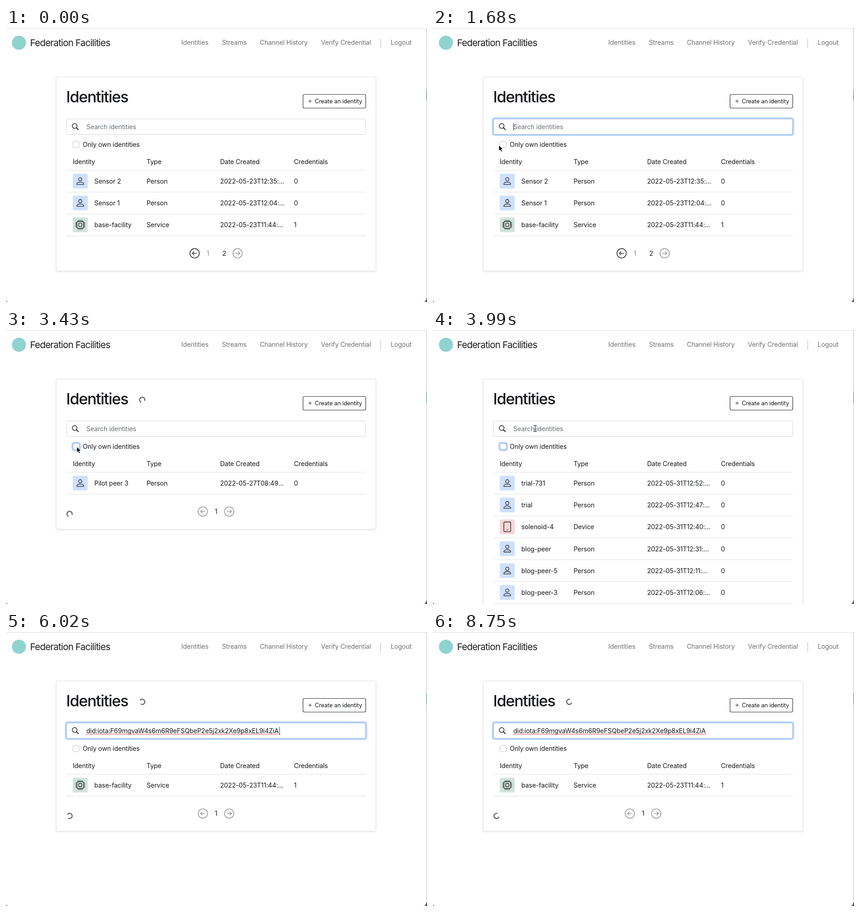
An HTML page for the animation above (8.82 s loop, 927 px wide and 604 px high).

```html
<!DOCTYPE html>
<html lang="en">
<head>
<meta charset="utf-8">
<title>Identities</title>
<style>
  html, body { margin: 0; width: 100%; height: 100%; overflow: hidden; background: #fff; }
  svg { display: block; width: 927px; height: 604px; }
  text { font: 430 14.2px Inter, "Noto Sans", sans-serif; letter-spacing: -.12px; fill: #16181b; white-space: pre; }
  .brand { font-size: 20.5px; letter-spacing: -.8px; fill: #1c1c1c; }
  .title { font-size: 34.2px; font-weight: 550; letter-spacing: -1.38px; }
  .nav { fill: #6f6f6f; }
  .hint { fill: #6a7076; }
  .small { font-size: 12.7px; }
  .mid { text-anchor: middle; }
  .off { fill: #8b8b8b; }
  .line { fill: none; stroke-linecap: round; stroke-linejoin: round; }
  .card { fill: #fff; stroke: #dfdfdf; filter: drop-shadow(0 2px 2px rgba(0,0,0,.08)); }
</style>
</head>
<body>
<svg viewBox="0 0 927 604" xmlns="http://www.w3.org/2000/svg">
  <rect width="927" height="604" fill="#b4b6b8"/>
  <path d="M926 136v24" stroke="#2f6b5c" stroke-width="2"/>
  <path d="M0 604v-6M927 604v-8" stroke="#555" stroke-width="8"/>
  <path d="M0 .6H926V594Q926 604 916 604H5Q0 604 0 599Z" fill="#fff"/>
  <g id="page"></g>
</svg>
<script>
const LOOP = 8820, STEP = 70, ROW = 48.2;
const page = document.getElementById('page');

const CHECK = 2240, OWN_LIST = 2380, UNCHECK = 3290, FULL_LIST = 3500;
const FOCUS_A = 1330, BLUR_A = 2170, FOCUS_B = 4270;
const PASTE = 4830, SEARCH = 5320, FOUND = 5600;
const DID = 'did:iota:F69mgvaW4s6m6R9eFSQbeP2e5j2xk2Xe9p8xEL9i4ZiA';

// name, type, date, credentials
const ROOT = ['base-facility', 'Service', '2022-05-23T11:44:...', 1];
const person = (name, date) => [name, 'Person', date, 0];
const LISTS = {
  second: [person('Sensor 2', '2022-05-23T12:35:...'), person('Sensor 1', '2022-05-23T12:04:...'), ROOT],
  own: [person('Pilot peer 3', '2022-05-27T08:49...')],
  first: [
    person('trial-731', '2022-05-31T12:52:...'),
    person('trial', '2022-05-31T12:47:...'),
    ['solenoid-4', 'Device', '2022-05-31T12:40:...', 0],
    person('blog-peer', '2022-05-31T12:31:...'),
    person('blog-peer-5', '2022-05-31T12:11:...'),
    person('blog-peer-3', '2022-05-31T12:06:...')
  ],
  found: [ROOT]
};

// pointer paths: time, x, y
const PATHS = [
  [[350, 505, 529], [840, 400, 370], [1190, 250, 219], [1330, 240, 217], [1680, 145, 258.5],
   [2030, 156, 257.5], [3640, 156, 257.5], [3990, 225, 217], [PASTE, 225, 217]],
  [[6510, 300, 217], [6800, 622, 400], [7070, 585, 520], [7560, 462, 597.5], [7770, 430, 622]]
];

const text = (x, y, s, cls = '') => `<text x="${x}" y="${y}" class="${cls}">${s}</text>`;
const box = (x, y, w, h, r, attrs) => `<rect x="${x}" y="${y}" width="${w}" height="${h}" rx="${r}" ${attrs}/>`;
const line = (d, color, width, extra = '') =>
  `<path class="line" d="${d}" stroke="${color}" stroke-width="${width}" ${extra}/>`;
const at = (x, y, s) => `<g transform="translate(${x} ${y})">${s}</g>`;
const clamp = v => Math.max(0, Math.min(1, v));

function chip() {
  let pins = '';
  for (let i = -1.5; i < 2; i++) {
    const p = i * 3;
    pins += `M${p} -10.4v2.8M${p} 7.6v2.8M-10.4 ${p}h2.8M7.6 ${p}h2.8`;
  }
  return line(pins, '#222', 1.1) +
    box(-7.4, -7.4, 14.8, 14.8, 2.4, 'fill="none" stroke="#222" stroke-width="1.3"') +
    box(-3.5, -3.5, 7, 7, 1, 'fill="none" stroke="#222" stroke-width="1.3"');
}

const ICONS = {
  Person: ['#cfe0fe', '<circle cy="-4" r="3.7" fill="none" stroke="#222" stroke-width="1.3"/>' +
    line('M-7 7.4H7Q7.8 7.4 7.6 6.4C7 3.4 4 2.2 0 2.2S-7 3.4 -7.6 6.4Q-7.8 7.4 -7 7.4Z', '#222', 1.3)],
  Service: ['#d1e4dc', chip()],
  Device: ['#f8d6d9', box(-7.5, -10.7, 15, 21.4, 2.4, 'fill="none" stroke="#222" stroke-width="1.4"') +
    '<circle cy="7" r="1.2" fill="#222"/>']
};

function row([name, type, date, count], i) {
  const y = 313.5 + ROW * i, base = y + 29.5, [tint, icon] = ICONS[type];
  return box(147, y + 7.7, 33, 32.6, 3.5, `fill="${tint}"`) + at(163.5, y + 24, icon) +
    text(194.5, base, name) + text(309.5, base, type) + text(471.5, base, date) + text(634, base, count) +
    line(`M133 ${y + ROW}H792`, '#dee0e2', 1);
}

function arrow(x, y, dir, color) {
  return at(x, y, `<circle r="10.3" fill="none" stroke="${color}" stroke-width="1.4"/>` +
    line(`M${-4.8 * dir} 0H${4.8 * dir}M${1.3 * dir} -3.6L${5 * dir} 0L${1.3 * dir} 3.6`, color, 1.3));
}

function pager(y, two) {
  return two
    ? arrow(415.3, y, -1, '#1b1b1b') + text(444.5, y + 5, 1, 'mid off') +
      text(480.5, y + 5, 2, 'mid') + arrow(510, y, 1, '#8d8d8d')
    : arrow(433.5, y, -1, '#8d8d8d') + text(462.5, y + 5, 1, 'mid') + arrow(491.5, y, 1, '#8d8d8d');
}

function spinner(x, y, t) {
  const turn = 150 + (t - 7560) / 790 * 360;
  return `<g transform="translate(${x} ${y}) rotate(${turn})">` +
    '<path d="M4.03 4.03A5.7 5.7 0 1 1 4.03 -4.03" fill="none" stroke="#6c6e71" stroke-width="2.6"/></g>';
}

function ring(x, y, w, h, r, amount) {
  if (!amount) return '';
  return `<g opacity="${amount}">` +
    box(x - 1.7, y - 1.7, w + 3.4, h + 3.4, r + 1.7, 'fill="none" stroke="#bcd6fc" stroke-width="3.4"') +
    box(x, y, w, h, r, 'fill="none" stroke="#86b4f8" stroke-width="1.1"') + '</g>';
}

function focusAmount(t, from, to) {
  return t < from || t >= to ? 0 : clamp((t - from + STEP) / 150);
}

function header() {
  return '<circle cx="28.5" cy="32.5" r="15.5" fill="#8fd3cf"/>' +
    text(53, 39.7, 'Federation Facilities', 'brand') +
    text(386, 37.3, 'Identities', 'nav') + text(475.5, 37.3, 'Streams', 'nav') +
    text(559, 37.3, 'Channel History', 'nav') + text(693.5, 37.3, 'Verify Credential', 'nav') +
    line('M825 23.5V43.5', '#c4c4c4', 1.3) + text(847, 37.3, 'Logout', 'nav');
}

function search(t) {
  const first = focusAmount(t, FOCUS_A, BLUR_A), second = focusAmount(t, FOCUS_B, LOOP);
  const pasted = t >= PASTE;
  let out = box(133, 200.5, 659, 34, 3.5, 'fill="#fff" stroke="#d0d3d6"') +
    ring(133, 200.5, 659, 34, 3.5, first || second) +
    '<circle cx="151.2" cy="216" r="5.3" fill="none" stroke="#1b1b1b" stroke-width="1.4"/>' +
    line('M155.2 220L159.4 224.1', '#1b1b1b', 1.8) +
    (pasted ? text(177, 223, DID) : text(177, 223, 'Search identities', 'hint'));
  if (pasted) out += line('M178 225.3H602', '#e0392f', 1.9, 'stroke-dasharray="0 3"');
  const since = pasted ? PASTE : second ? FOCUS_B : FOCUS_A;
  if ((first || second) && (t - since) % 1030 < 515)
    out += line(pasted ? 'M602.5 209.5V226' : 'M177.5 209.5V226', '#333', 1);
  return out;
}

function checkbox(t) {
  const on = t >= CHECK && t < UNCHECK;
  return box(147.5, 249.8, 14, 14, 3.4, on ? 'fill="#0d6efd" stroke="#0d6efd"' : 'fill="#fff" stroke="#bfc0c1"') +
    ring(147.5, 249.8, 14, 14, 3.4, focusAmount(t, BLUR_A, FOCUS_B)) +
    (on ? line('M151.2 257L153.6 259.5L158 254.4', '#fff', 2) : '') +
    text(169, 262.2, 'Only own identities');
}

function pointer(t) {
  const path = PATHS.find(p => t >= p[0][0] && t < p[p.length - 1][0]);
  if (!path) return '';
  const i = path.findIndex(p => p[0] > t), [t0, x0, y0] = path[i - 1], [t1, x1, y1] = path[i];
  const k = (t - t0) / (t1 - t0), x = x0 + (x1 - x0) * k, y = y0 + (y1 - y0) * k;
  if (x > 133 && x < 792 && y > 200 && y < 235) {
    const beam = 'M-3 -7Q0 -7 0 -5Q0 -7 3 -7M0 -5V5M-3 7Q0 7 0 5Q0 7 3 7M-1.5 1.5H1.5';
    return at(x, y, line(beam, '#fff', 2.6) + line(beam, '#222', 1.2));
  }
  return at(x, y, '<path d="M0 0V12.5L2.9 9.8L5 14.5L7.2 13.5L5.2 9H9.2Z" fill="#000" stroke="#fff" stroke-width=".9"/>');
}

function render(t) {
  const key = t < OWN_LIST ? 'second' : t < FULL_LIST ? 'own' : t < FOUND ? 'first' : 'found';
  const rows = LISTS[key], full = key === 'first';
  const end = 313.5 + ROW * rows.length;
  const busy = t >= SEARCH || t >= OWN_LIST - STEP && t < OWN_LIST || t >= FULL_LIST - STEP && t < FULL_LIST;
  const bottom = full ? 640 : end + 77.4;
  page.innerHTML = header() +
    box(110.5, 108, 704, bottom - 108, 3.5, 'class="card"') +
    text(132.5, 163.5, 'Identities', 'title') +
    box(654, 146.5, 138, 30, 3, 'fill="#fff" stroke="#2b2e31" stroke-width="1.2"') +
    line('M666.3 161.3H672.7M669.5 158.1V164.5', '#333', 1.1) +
    text(680, 166, 'Create an identity', 'small') +
    search(t) + checkbox(t) +
    text(147, 300.3, 'Identity') + text(309.5, 300.3, 'Type') +
    text(471.5, 300.3, 'Date Created') + text(634, 300.3, 'Credentials') +
    line('M133 313.5H792', '#dee0e2', 1) +
    rows.map(row).join('') +
    (full ? '' : pager(end + 38.5, key === 'second')) +
    (busy ? spinner(300, 154, t) + (full ? '' : spinner(140, end + 43.8, t)) : '') +
    pointer(t);
}

const start = performance.now();
let shown = -1;
function tick(now) {
  const t = Math.floor(Math.max(0, now - start) % LOOP / STEP) * STEP;
  if (t !== shown) render(shown = t);
  requestAnimationFrame(tick);
}
tick(start);
</script>
</body>
</html>
```
